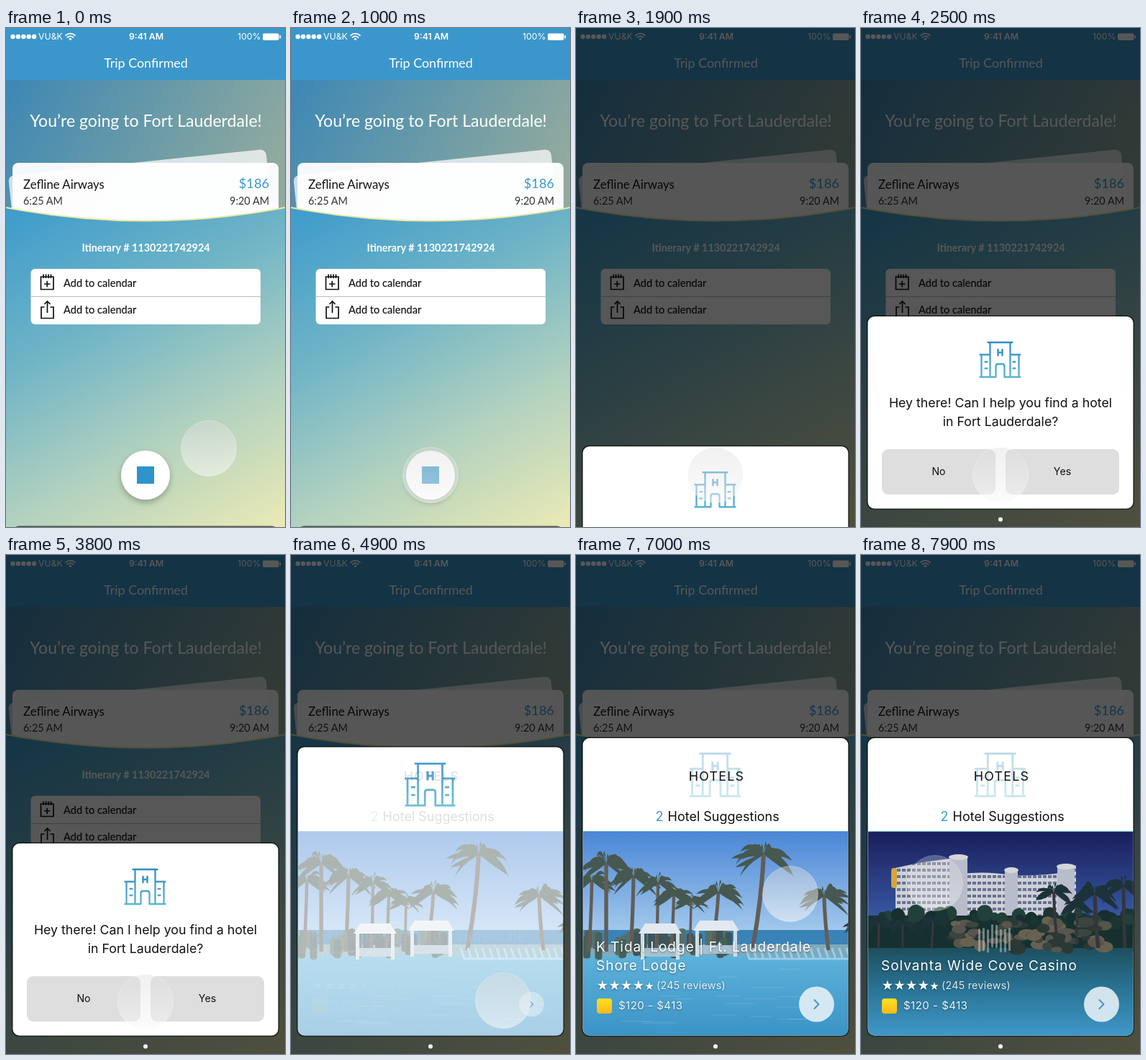
Animation, 388 px wide and 692 px high, one loop 8 s. Source, as an HTML page:

```html
<!DOCTYPE html>
<html lang="en">
<head>
<meta charset="utf-8">
<title>Trip Confirmed</title>
<style>
html, body { margin: 0; width: 100%; height: 100%; overflow: hidden; background: #3b97cb; }
svg { display: block; width: 100vw; height: 100vh; font-family: Lato, sans-serif; }
.ui { font-family: Inter, Roboto, sans-serif; }
.mid { text-anchor: middle; }
.end { text-anchor: end; }
.white { fill: #fff; }
.line { fill: none; stroke-linecap: round; stroke-linejoin: round; }
.soft { text-shadow: 0 1px 3px #0006; }
.name { font-size: 19px; letter-spacing: 1px; }
</style>
</head>
<body>
<svg viewBox="0 0 388 692" xmlns="http://www.w3.org/2000/svg">
<defs>
  <linearGradient id="dusk" gradientUnits="userSpaceOnUse" x1="0" y1="270" x2="265" y2="759">
    <stop offset="0" stop-color="#419dcb"/><stop offset=".33" stop-color="#6fb4c6"/>
    <stop offset=".66" stop-color="#b1d1bf"/><stop offset="1" stop-color="#ebeab5"/>
  </linearGradient>
  <linearGradient id="haze" gradientUnits="userSpaceOnUse" x1="0" y1="72" x2="330" y2="270">
    <stop offset="0" stop-color="#3d87b5"/><stop offset=".5" stop-color="#6699a8"/><stop offset="1" stop-color="#92aa9e"/>
  </linearGradient>
  <linearGradient id="glow" x2="0" y2="1">
    <stop offset="0" stop-color="#dedede" stop-opacity=".42"/><stop offset="1" stop-color="#fafafa" stop-opacity=".55"/>
  </linearGradient>
  <linearGradient id="ink" gradientUnits="userSpaceOnUse" x1="0" y1="-25" x2="0" y2="25">
    <stop offset="0" stop-color="#2f8cc6"/><stop offset="1" stop-color="#5bb5d0"/>
  </linearGradient>
  <linearGradient id="day" x2="0" y2="1">
    <stop offset="0" stop-color="#4a86d6"/><stop offset="1" stop-color="#a3c9ec"/>
  </linearGradient>
  <linearGradient id="night" x2="0" y2="1">
    <stop offset="0" stop-color="#1a1f5c"/><stop offset="1" stop-color="#3f66b4"/>
  </linearGradient>
  <linearGradient id="pool" x2="0" y2="1">
    <stop offset="0" stop-color="#5db2da"/><stop offset="1" stop-color="#3a93c6"/>
  </linearGradient>
  <linearGradient id="pond" x2="0" y2="1">
    <stop offset="0" stop-color="#1d4f5e"/><stop offset=".5" stop-color="#2b7699"/><stop offset="1" stop-color="#3f98c8"/>
  </linearGradient>
  <linearGradient id="gold" x2="0" y2="1">
    <stop offset="0" stop-color="#ffe01e"/><stop offset="1" stop-color="#f8b91c"/>
  </linearGradient>
  <pattern id="rooms" width="7" height="9" patternUnits="userSpaceOnUse">
    <rect x="1" y="3" width="5" height="4" fill="#66728f"/>
  </pattern>
  <filter id="drop" x="-30%" y="-30%" width="160%" height="170%">
    <feDropShadow dx="0" dy="4" stdDeviation="4" flood-opacity=".28"/>
  </filter>
  <clipPath id="bowl"><path d="M0 72H388V249Q194 286 0 249Z"/></clipPath>
  <clipPath id="frame"><path d="M10 383H378.500V658a8.500 8.500 0 0 1-8.500 8.500H18.500a8.500 8.500 0 0 1-8.500-8.500Z"/></clipPath>
  <g id="meta" class="ui white soft">
    <text x="28.500" y="603" font-size="18.600" style="font-family:'DejaVu Sans',sans-serif">★★★★<tspan font-size="15">★</tspan></text>
    <text x="112" y="602" font-size="14.300" letter-spacing=".25" opacity=".85">(245 reviews)</text>
    <rect x="29" y="615" width="21" height="21" rx="4" fill="url(#gold)"/>
    <text x="59" y="630" font-size="15" letter-spacing=".5" opacity=".9">$120 - $413</text>
  </g>
</defs>

<rect width="388" height="692" fill="url(#dusk)"/>
<g clip-path="url(#bowl)">
  <rect y="72" width="388" height="210" fill="url(#haze)"/>
  <rect width="360" height="95" rx="8" transform="translate(3 205) rotate(-5.900)" fill="#fff" opacity=".72"/>
  <rect x="9" y="187" width="370" height="100" rx="8" fill="#fff" opacity=".95"/>
</g>
<path d="M0 249Q194 286 388 249" fill="none" stroke="#e9eaa6" stroke-width="2"/>
<rect width="388" height="72" fill="#3b97cb"/>
<g class="ui white" font-size="12.300">
  <g id="signal"></g>
  <text x="45" y="16.300">VU&amp;K</text>
  <path class="line" d="M83 10.200Q89.500 5 96 10.200M85.500 13Q89.500 9.800 93.500 13" stroke="#fff" stroke-width="1.800"/>
  <circle cx="89.500" cy="15.300" r="1.600"/>
  <text class="mid" x="195" y="16.300" font-weight="600">9:41 AM</text>
  <text class="end" x="354.500" y="16.300">100%</text>
  <rect x="357" y="7.500" width="22.500" height="9.500" rx="2"/><rect x="380.500" y="10" width="1.700" height="4.500" rx=".8"/>
</g>
<text class="mid white" x="194.500" y="54.500" font-size="17.900">Trip Confirmed</text>
<text class="mid white" x="194.500" y="137" font-size="23.100">You’re going to Fort Lauderdale!</text>
<g fill="#111">
  <text x="24" y="222.500" font-size="16.800">Zefline Airways</text>
  <text class="end" x="366" y="222" font-size="18.200" fill="#3b97cb">$186</text>
  <g font-size="14.400" fill="#333"><text x="24" y="244.500">6:25 AM</text><text class="end" x="366" y="244.500">9:20 AM</text></g>
</g>
<text class="mid white" x="194.500" y="309.500" font-size="14.400" font-weight="700">Itinerary # 1130221742924</text>
<rect x="34.500" y="334" width="319.500" height="77" rx="6" fill="#fff"/>
<path d="M35 372.500H354" stroke="#bbb"/>
<g font-size="14.600" fill="#111" stroke="#111" stroke-width=".15"><text x="80" y="359">Add to calendar</text><text x="80" y="395.500">Add to calendar</text></g>
<path d="M48.500 345H66V362.500H48.500ZM52 341.500V347M55.500 341.500V347M59 341.500V347M62.500 341.500V347M53 355H61.500M57.200 350.800V359.200M53.500 387H49V402.500H66V387H61.500M57.500 395V379.500M53.500 383L57.500 379L61.500 383" fill="none" stroke="#111" stroke-width="1.700"/>

<g id="bubble" filter="url(#drop)">
  <circle r="34" fill="#fff"/><rect x="-12" y="-12" width="24" height="24" fill="#2f93c9"/>
</g>
<rect id="dim" width="388" height="692"/>

<g id="sheet">
  <rect id="card" x="9.500" width="369" rx="9" fill="#fff" stroke="#0009" stroke-width="3" paint-order="stroke"/>
  <circle cx="194" cy="681.500" r="3" fill="#fff"/>
  <g id="ask" class="ui mid" fill="#111" font-size="17.750">
    <text x="194" y="525.500">Hey there! Can I help you find a hotel</text>
    <text x="194" y="552">in Fort Lauderdale?</text>
    <g fill="#dedede"><rect x="29" y="584" width="158" height="63" rx="9"/><rect x="201" y="584" width="158" height="63" rx="9"/></g>
    <g font-size="14.200"><text x="108" y="620">No</text><text x="280" y="620">Yes</text></g>
  </g>
  <g id="icon" class="line" stroke="url(#ink)" stroke-width="2.300">
    <path d="M-17-24H17M-14-24V24H-6V9Q-6 6-3 6H3Q6 6 6 9V24H14V-24M-14-7H-28M-26-7V24M-28 24H-14M14-7H28M26-7V24M28 24H14M-21 3H-18M-21 12H-18M18 3H21M18 12H21"/>
    <path d="M-3-14V-6M3-14V-6M-3-10H3" stroke-width="2.600"/>
  </g>
  <g id="photos" clip-path="url(#frame)"><g id="strip">
    <g id="beach"></g>
    <g id="resort" transform="translate(369)"></g>
    <g id="labels">
      <g class="ui white soft name"><text x="28" y="549.500">K Tidal Lodge | Ft. Lauderdale</text><text x="28" y="576">Shore Lodge</text></g>
    </g>
    <use id="info" href="#meta"/>
    <g transform="translate(369)"><text class="ui white soft name" x="28" y="576">Solvanta Wide Cove Casino</text><use href="#meta"/></g>
  </g>
  <path d="M10 383H378.500" stroke="#4a9cc4" stroke-width="2"/></g>
  <g id="heading" class="ui" fill="#111">
    <text class="mid" x="195.500" y="313" font-size="17.900" letter-spacing="1.200">HOTELS</text>
    <text x="110.500" y="368.500" font-size="18" fill="#3b9cc8">2</text>
    <text x="127.500" y="368.500" font-size="18">Hotel Suggestions</text>
  </g>
  <g id="next"><circle r="24.500" fill="#e9f3f8" opacity=".88"/><path class="line" d="M-3-6L3 0L-3 6" stroke="#4796c0" stroke-width="2"/></g>
</g>
<circle id="touch" r="38.500" fill="url(#glow)" stroke="#fff" stroke-opacity=".3"/>
</svg>
<script>
const $ = id => document.getElementById(id);
const many = (n, f) => Array.from({ length: n }, (_, i) => f(i)).join('');
const box = (x, y, w, h, fill, rx = 0) => `<rect x="${x}" y="${y}" width="${w}" height="${h}" fill="${fill}" rx="${rx}"/>`;
let seed = 7;
const rnd = () => (seed = seed * 16807 % 2147483647) / 2147483647;
const pick = list => list[rnd() * list.length | 0];

// Crown at (x, y), foot of the trunk at (fx, fy), fronds of length r
function palm(x, y, fx, fy, r, leaf, bark) {
  const trunk = `<path d="M${x} ${y}Q${x + (fx - x) * .2} ${(y + fy) / 2} ${fx} ${fy}" fill="none" stroke="${bark}" stroke-width="${r / 7}"/>`;
  const fronds = many(18, i => {
    const a = Math.PI * (.88 + i * 1.24 / 17), len = r * (.75 + rnd() * .35);
    const cx = x + Math.cos(a) * len * .6, cy = y + Math.sin(a) * len * .65 - r * .12;
    const tx = x + Math.cos(a) * len, ty = y + Math.sin(a) * len * .5 + r * (.15 + rnd() * .55);
    return `M${x} ${y}Q${cx} ${cy} ${tx} ${ty}Q${cx} ${cy + r * .32} ${x} ${y}`;
  });
  return trunk + `<path d="${fronds}" fill="${leaf}"/>`;
}
const cabana = (x, y, w) =>
  `<path d="M${x} ${y + 14}L${x + 9} ${y}H${x + w - 9}L${x + w} ${y + 14}Z" fill="#e2e9f0"/>` +
  [3, w - 8].map(d => box(x + d, y + 14, 5, 36, '#cfdde6')).join('') + box(x + 8, y + 34, w - 16, 12, '#a5c0cf');

const leaf = '#46584f', bark = '#625d57';
$('beach').innerHTML = box(10, 383, 369, 140, 'url(#day)') + box(10, 520, 369, 30, '#3a83b8') +
  box(10, 540, 369, 22, '#7fa9bb') + box(10, 556, 369, 112, 'url(#pool)') +
  many(40, () => box(10 + rnd() * 210, 515 + rnd() * 20, 10, 26, pick(['#46605a', '#55706a', '#3f5558']), 4)) +
  [[22, 452, 18, 550, 32], [42, 428, 42, 550, 38], [80, 446, 76, 550, 36], [114, 455, 112, 550, 30],
   [136, 472, 132, 550, 30], [160, 480, 158, 550, 24], [198, 468, 188, 550, 34], [261, 415, 245, 548, 42], [345, 473, 351, 548, 36]]
    .map(p => palm(...p, leaf, bark)).join('') +
  cabana(87, 511, 60) + cabana(163, 507, 64) +
  many(15, i => `<path d="M${236 + i * 10} 545l5 15h9" fill="none" stroke="#9fcbe2" stroke-width="3"/>`) +
  many(22, () => box(10 + rnd() * 330, 570 + rnd() * 90, 20 + rnd() * 30, 1, '#ffffff22'));

const wing = 'M48 434Q90 424 135 420V500H48ZM140 442Q175 438 209 444Q245 446 285 440L299 430V500H140Z';
const tower = (x, y, w) => box(x, y, w, 502 - y, '#b9bccb', 3) + `<ellipse cx="${x + w / 2}" cy="${y}" rx="${w / 2 + 1}" ry="4" fill="#d5d6da"/>`;
$('resort').innerHTML = box(10, 383, 369, 150, 'url(#night)') +
  `<path d="${wing}" fill="#cfd0da"/><path d="${wing}" fill="url(#rooms)"/>` +
  tower(123, 419, 25) + tower(200, 437, 18) + tower(273, 432, 24) +
  box(42, 434, 8, 28, '#d9a53a', 4) + box(10, 500, 369, 50, '#16302f') + box(10, 545, 369, 122, 'url(#pond)') +
  many(40, () => `<circle cx="${10 + rnd() * 369}" cy="${496 + rnd() * 14}" r="${5 + rnd() * 7}" fill="${pick(['#16302f', '#22403a', '#1b3532'])}"/>`) +
  many(60, () =>
    `<ellipse cx="${125 + rnd() * 220}" cy="${508 + rnd() * 40}" rx="${6 + rnd() * 8}" ry="${4 + rnd() * 4}" fill="${pick(['#57554c', '#3b443f', '#686152', '#2c3835'])}"/>`) +
  many(8, i => box(163 + i * 6, 512 + rnd() * 8, 3, 32, '#c8d8dd77', 1)) +
  [[25, 510, 24, 546, 24], [58, 512, 58, 546, 22], [100, 508, 98, 546, 22], [268, 468, 272, 530, 28],
   [325, 470, 330, 545, 38], [365, 460, 367, 545, 34], [300, 488, 300, 540, 24]]
    .map(p => palm(...p, '#1d3238', '#35363a')).join('');
$('signal').innerHTML = many(5, i => `<circle cx="${9.500 + i * 7.400}" cy="12" r="3.200"/>`);

const span = (t, a, b) => Math.min(1, Math.max(0, (t - a) / (b - a)));
const out = (t, a, b) => 1 - (1 - span(t, a, b)) ** 3;
const both = (t, a, b) => { const u = span(t, a, b); return u * u * (3 - 2 * u); };
const place = (id, x, y, s = 1) => $(id).setAttribute('transform', `translate(${x} ${y}) scale(${s})`);
const fade = (id, v) => $(id).setAttribute('opacity', v);

// Finger stops: start time, end time, x, y
const stops = [[100, 800, 194, 620], [3800, 4500, 295, 618], [6500, 6950, 298, 470], [7050, 7500, 103, 455]];

function draw(t) {
  let x = 282, y = 583;
  for (const [a, b, tx, ty] of stops) {
    const u = both(t, a, b);
    x += (tx - x) * u;
    y += (ty - y) * u;
  }
  place('touch', x, y);
  fade('touch', 1 - .3 * span(t, 7400, 7800));

  const press = both(t, 1250, 1600);
  place('bubble', 194, 620, 1 - press);
  fade('bubble', press < 1 ? 1 : 0);

  const grow = out(t, 4700, 5060);
  fade('dim', .66 * span(t, 1720, 1860));
  place('sheet', 0, 292 * (1 - out(t, 1800, 2480)));
  $('card').setAttribute('y', 400 - 146 * grow);
  $('card').setAttribute('height', 266.500 + 146 * grow);
  fade('ask', 1 - span(t, 4700, 4860));
  place('icon', 193.500, 460 - 155 * grow, 1 + .23 * grow);
  fade('icon', 1 - .7 * span(t, 4820, 5200));

  const show = span(t, 4860, 5350);
  fade('photos', span(t, 4720, 5130));
  fade('heading', span(t, 4850, 5250));
  fade('labels', show);
  place('labels', 0, -20 * (1 - out(t, 4850, 5400)));
  fade('info', show);
  place('next', 334.500, 623, out(t, 4800, 5100));
  fade('next', span(t, 4750, 5000));
  place('strip', -369 * both(t, 7050, 7600), 0);
}
function tick() {
  draw(performance.now() % 8000);
  requestAnimationFrame(tick);
}
tick();
</script>
</body>
</html>
```
